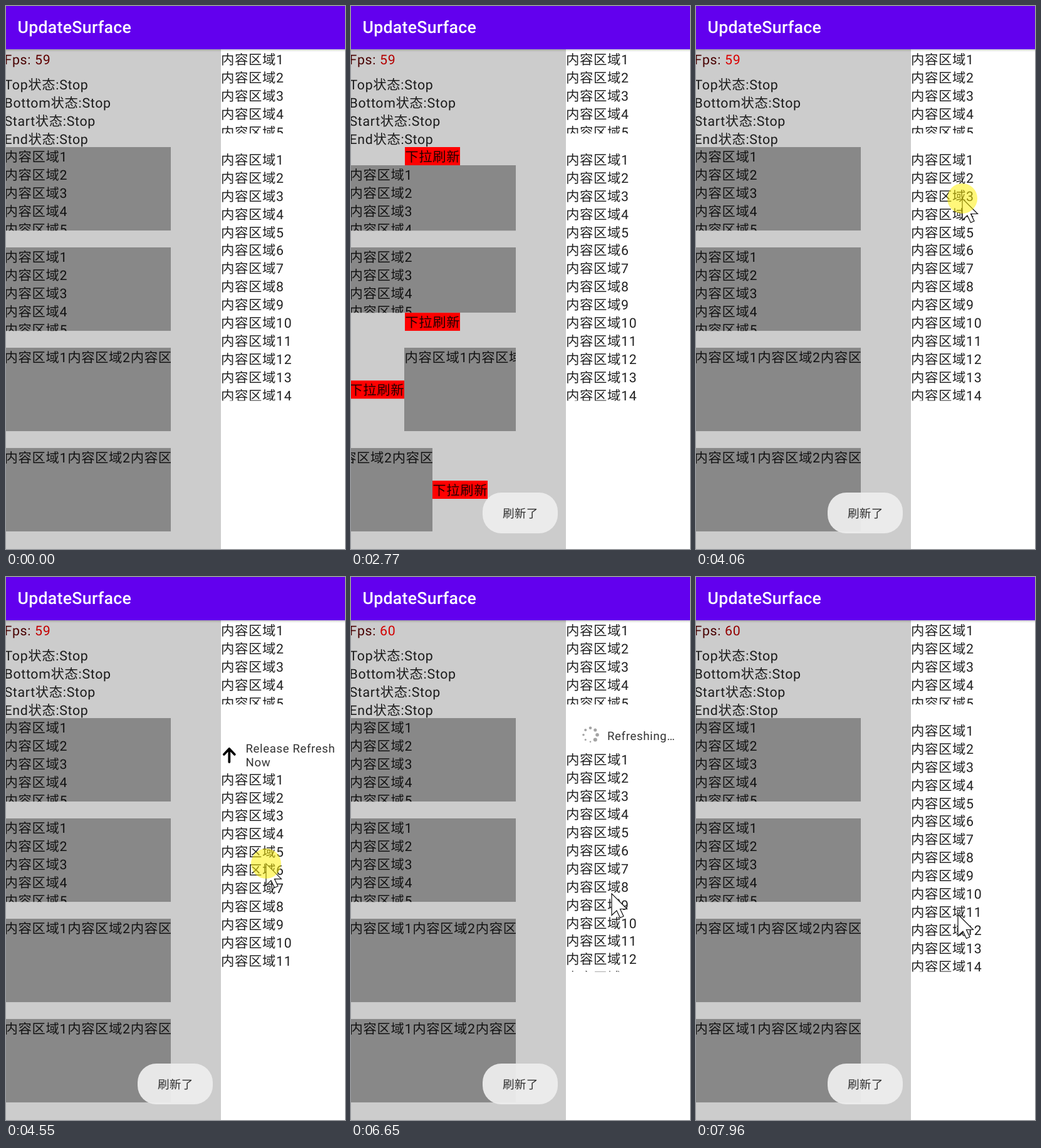
Recreate the animation shown at these times as an HTML page. Size 541 by 866 pixels, loop 8 s.

```html
<!DOCTYPE html>
<html lang="zh-CN">
<head>
<meta charset="utf-8">
<style>
  html, body { margin: 0; width: 100%; height: 100%; overflow: hidden; background: #fff; }
  svg { display: block; width: 541px; height: 866px; }
  text { font: 21.33px Roboto, "Noto Sans CJK SC", "Noto Sans CJK", sans-serif;
         letter-spacing: .667px; fill: #000; fill-opacity: .87; white-space: pre;
         text-rendering: geometricPrecision; }
  .title { font-size: 26.67px; font-weight: 500; letter-spacing: .3px; fill: #fff; fill-opacity: 1; }
  .hint { font-size: 18.67px; letter-spacing: .6px; fill-opacity: .8; }
  .toast { font-size: 18.67px; letter-spacing: .2px; fill-opacity: .8; }
</style>
</head>
<body>
<svg id="stage" viewBox="0 0 541 866"></svg>
<script>
const LOOP = 8000, ROW = 28.9, BASE = 23.3, HEADER = 46.5;
const stage = document.getElementById('stage');

function add(parent, tag, attrs = {}, content) {
  const el = document.createElementNS('http://www.w3.org/2000/svg', tag);
  for (const k in attrs) el.setAttribute(k, attrs[k]);
  if (content !== undefined) el.textContent = content;
  parent.appendChild(el);
  return el;
}
const rect = (p, x, y, width, height, fill) => add(p, 'rect', { x, y, width, height, fill });
const text = (p, x, y, str, cls = '') => add(p, 'text', { x, y, class: cls }, str);
const move = (el, x, y) => el.setAttribute('transform', `translate(${x} ${y})`);
const show = (el, on) => el.setAttribute('visibility', on ? 'inherit' : 'hidden');
const clamp = v => Math.max(0, Math.min(1, v));
const easeOut = p => 1 - (1 - clamp(p)) ** 2;

// Linear track through [time, value] pairs
function track(t, keys) {
  let i = 0;
  while (i < keys.length - 2 && t > keys[i + 1][0]) i++;
  const [a, va] = keys[i], [b, vb] = keys[i + 1];
  return va + (vb - va) * clamp((t - a) / (b - a));
}

let clips = 0;
function clipped(parent, x, y, width, height) {
  const id = 'clip' + clips++;
  rect(add(stage, 'clipPath', { id }), x, y, width, height);
  return add(parent, 'g', { 'clip-path': `url(#${id})` });
}
function rows(p, x, y, count) {
  for (let i = 0; i < count; i++) text(p, x, y + BASE + i * ROW, '内容区域' + (i + 1));
}
function label(p) {
  const g = add(p, 'g');
  rect(g, 0, 0, 88, 29, '#f00');
  text(g, .3, BASE - .3, '下拉刷新');
  return g;
}

// Left panel
rect(stage, 0, 0, 541, 866, '#fff');
rect(stage, 0, 69, 343, 797, '#ccc');
const fps = text(stage, -2.5, 93, '');
add(fps, 'tspan', { fill: '#480000', 'fill-opacity': 1 }, 'Fps: ');
const fpsValue = add(fps, 'tspan', { 'fill-opacity': 1 });
const sides = ['Top', 'Bottom', 'Start', 'End'];
const states = sides.map((_, i) => text(stage, -2.5, 132.8 + i * ROW, ''));

const panes = [225, 385, 545, 704.7].map((y, i) => {
  const box = clipped(stage, -3, y, i === 3 ? 346 : 266, 133.2);
  const list = add(box, 'g');
  const view = clipped(list, -3, y, 266, 133.2);
  rect(view, -3, y, 266, 133.2, '#888');
  if (i < 2) rows(view, -2.5, y, 5);
  else text(view, -2.5, y + BASE, '内容区域1内容区域2内容区域3');
  return { y, list, tag: label(box) };
});

// Right panel
rows(clipped(stage, 343, 69, 198, 134.3), 343, 69.6, 5);
const pullBox = clipped(stage, 343, 229.5, 198, 400);
const pullList = add(pullBox, 'g');
rows(pullList, 343, 229.6, 14);

const header = add(pullBox, 'g');
const arrow = add(header, 'path', {
  d: 'M0 11V-10M-8.5-1L0-10L8.5-1', fill: 'none', stroke: '#000',
  'stroke-width': 3.8, 'stroke-linecap': 'round', 'stroke-linejoin': 'round'
});
const hints = [['Pull Down To', 'Refresh'], ['Release Refresh', 'Now']].map(lines => {
  const g = add(header, 'g');
  lines.forEach((s, i) => text(g, 382.5, -4 + i * 21.7, s, 'hint'));
  return g;
});
const busy = add(header, 'g');
text(busy, 409, 7.5, 'Refreshing…', 'hint');
const spinner = add(busy, 'g');
for (let i = 0; i < 8; i++) {
  const a = i * Math.PI / 4;
  add(spinner, 'circle', {
    cx: 11 * Math.cos(a), cy: 11 * Math.sin(a), r: 1.3 + i * .25, fill: '#a4a4a4'
  });
}
const done = add(header, 'g');
text(done, 363.5, 7.5, 'Refresh Complete', 'hint');

// App bar
const shade = add(stage, 'linearGradient', { id: 'shade', x2: 0, y2: 1 });
add(shade, 'stop', { 'stop-opacity': .2 });
add(shade, 'stop', { offset: 1, 'stop-opacity': 0 });
rect(stage, 0, 69, 541, 4, 'url(#shade)');
rect(stage, 0, 0, 541, 69, '#6200ee');
text(stage, 18.5, 43, 'UpdateSurface', 'title');

// Toast
const toast = add(stage, 'g');
add(toast, 'rect', {
  x: 210, y: 776, width: 120, height: 65, rx: 30, fill: '#eee', 'fill-opacity': .93
});
text(toast, 242, 815.5, '刷新了', 'toast');

// Pointer
const pointer = add(stage, 'g');
add(pointer, 'path', {
  d: 'M0 0V34.5L8 27L13.5 38.5L19 36L13.5 24.5H24.5Z',
  fill: '#fff', stroke: '#111', 'stroke-width': 1.2
});
const press = add(pointer, 'circle', { r: 24, fill: '#fff000', 'fill-opacity': .52 });

const pointerX = [[3520, 445], [3900, 425], [4100, 425], [4550, 415], [5200, 416], [7000, 416], [7700, 418]];
const pointerY = [[3520, 262], [3900, 307], [4080, 307], [4550, 457], [5200, 505], [7000, 505], [7700, 538]];
const glow = [[0, 96], [300, 165], [700, 215], [1350, 215], [2080, 150], [2770, 180], [3400, 150],
              [4060, 218], [4550, 195], [5500, 150], [6650, 210], [7400, 200], [7960, 148]];

function drawPanes(t) {
  const open = t < 2800 ? easeOut((t - 470) / 300) : 1 - easeOut((t - 2800) / 300);
  const shift = [29 * open, -29 * open, 88 * open, -133 * open];
  panes.forEach(({ y, list, tag }, i) => {
    const s = shift[i];
    move(list, i < 2 ? 0 : s, i < 2 ? s : 0);
    if (i === 0) move(tag, 86, y - 29 + s);
    if (i === 1) move(tag, 86, y + 133.2 + s);
    if (i === 2) move(tag, -91 + s, y + 52.3);
    if (i === 3) move(tag, 263 + s, y + 52.3);
    show(tag, open > 0);
  });
  const state = t >= 770 && t < 2760 ? 'Refreshing' : 'Stop';
  states.forEach((el, i) => el.textContent = sides[i] + '状态:' + state);
}

function drawPull(t) {
  const drag = (track(t, pointerY) - 307) * .518;
  let offset = 0;
  if (t >= 4080) offset = Math.max(0, drag);
  if (t >= 5400) offset += (HEADER - offset) * easeOut((t - 5400) / 280);
  if (t >= 7680) offset = HEADER * (1 - easeOut((t - 7680) / 250));
  move(pullList, 0, offset);
  move(header, 0, 229.5 + offset - HEADER / 2);
  show(header, offset > 0);

  const ready = offset > HEADER, pulling = t < 5680;
  show(hints[0], pulling && !ready);
  show(hints[1], pulling && ready);
  show(arrow, pulling);
  show(busy, !pulling && t < 7600);
  show(done, t >= 7600);
  arrow.setAttribute('transform', `translate(356.3 0) rotate(${ready ? 0 : 180})`);
  spinner.setAttribute('transform', `translate(382 -1) rotate(${Math.floor(t / 100) * 45})`);
}

function draw(t) {
  fpsValue.textContent = t < 700 || (t >= 2480 && t < 5000) ? '59' : '60';
  fpsValue.setAttribute('fill', `rgb(${Math.round(track(t, glow))},0,0)`);
  drawPanes(t);
  drawPull(t);

  // Queued toasts follow one another with a short fade
  let alpha = clamp((t - 770) / 200);
  for (const c of [2950, 4930, 6900]) alpha = Math.min(alpha, clamp((Math.abs(t - c) - 20) / 150));
  toast.setAttribute('opacity', alpha);

  show(pointer, t >= 3520);
  move(pointer, track(t, pointerX), track(t, pointerY));
  show(press, t >= 3980 && t < 5400);
}

function tick() {
  draw(performance.now() % LOOP);
  requestAnimationFrame(tick);
}
tick();
</script>
</body>
</html>
```
